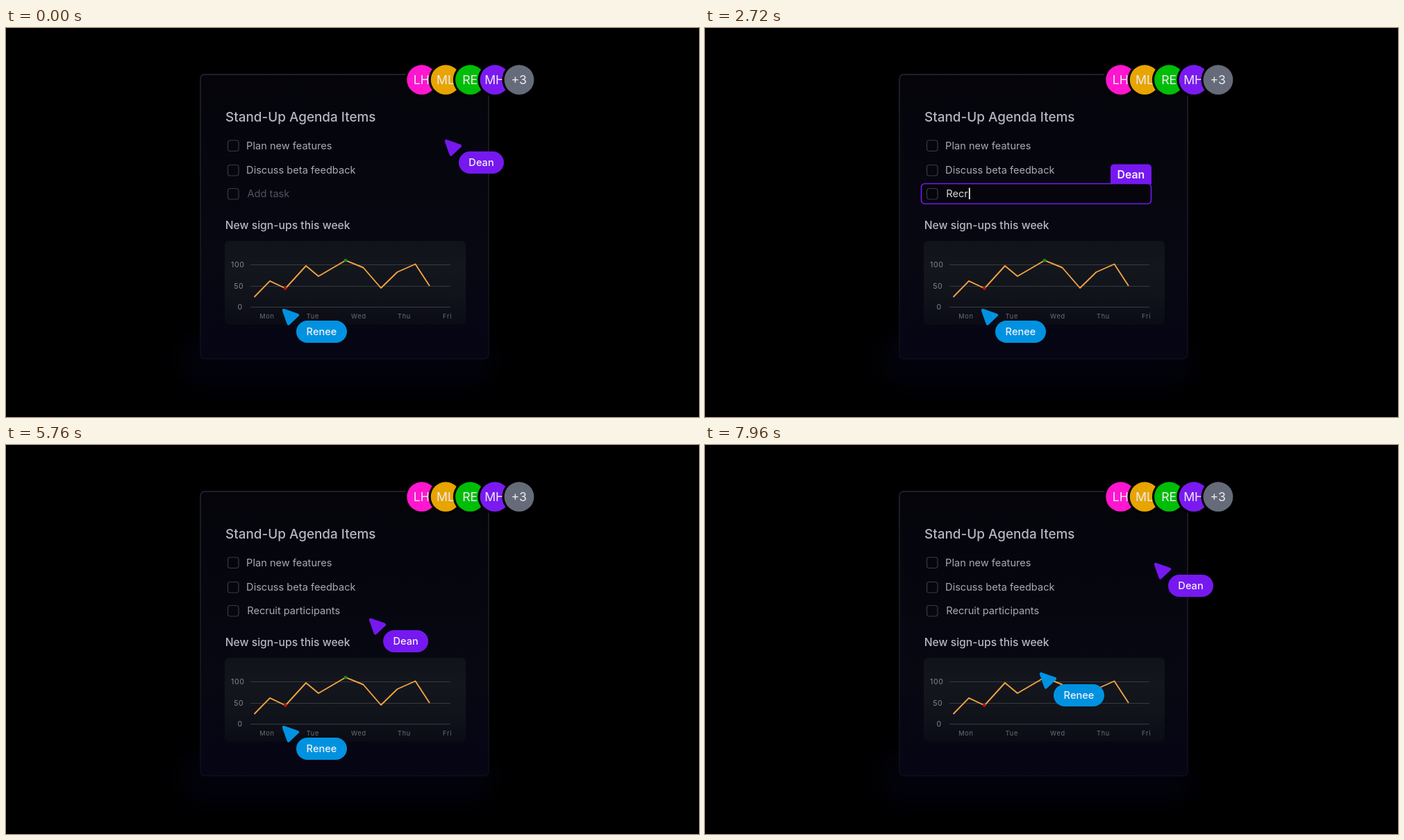
Recreate the animation shown at these times as an HTML page with a canvas. Size 998 by 561 pixels, loop 8 s.

```html
<!DOCTYPE html>
<html lang="en">
<head>
<meta charset="utf-8">
<title>Shared agenda</title>
<style>
  html, body { margin: 0; width: 100%; height: 100%; overflow: hidden; background: #000; }
  canvas { display: block; width: 998px; height: 561px; }
</style>
</head>
<body>
<canvas id="stage" width="998" height="561"></canvas>
<script>
const ctx = document.getElementById('stage').getContext('2d');
const LOOP = 8000;
const PURPLE = '#7618f0', BLUE = '#0092e0';
const TASK = 'Recruit participants';

// Times of the state changes, in ms
const HOVER_AT = 1240, FOCUS_AT = 1880, TYPE_AT = 2310, BLUR_AT = 4640;
const CHAR_MS = 100;

function text(str, x, y, size, color, { weight = 400, align = 'left', spacing = 0 } = {}) {
  ctx.font = `${weight} ${size}px Inter, sans-serif`;
  ctx.letterSpacing = spacing + 'px';
  ctx.textAlign = align;
  ctx.fillStyle = color;
  ctx.fillText(str, x, y);
  return ctx.measureText(str).width;
}

function box(x, y, w, h, r, fill, stroke, line = 1) {
  ctx.beginPath();
  ctx.roundRect(x, y, w, h, r);
  if (fill) { ctx.fillStyle = fill; ctx.fill(); }
  if (stroke) { ctx.strokeStyle = stroke; ctx.lineWidth = line; ctx.stroke(); }
}

function disc(x, y, r, color) {
  ctx.beginPath();
  ctx.arc(x, y, r, 0, Math.PI * 2);
  ctx.fillStyle = color;
  ctx.fill();
}

function vertical(y0, y1, ...colors) {
  const g = ctx.createLinearGradient(0, y0, 0, y1);
  colors.forEach((c, i) => g.addColorStop(i / (colors.length - 1), c));
  return g;
}

const clamp = v => Math.min(1, Math.max(0, v));
const ease = u => (1 - Math.cos(Math.PI * clamp(u))) / 2;
const mix = (a, b, u) => a + (b - a) * u;

// Smooth path through [time, x, y] keys, at rest at both ends
function follow(keys, t) {
  const last = keys.length - 1;
  if (t <= keys[0][0]) return keys[0].slice(1);
  if (t >= keys[last][0]) return keys[last].slice(1);
  const i = keys.findIndex(k => k[0] > t) - 1;
  const [a, b] = [keys[i], keys[i + 1]];
  const span = b[0] - a[0], u = (t - a[0]) / span;
  const slope = (n, d) => n === 0 || n === last ? 0
    : (keys[n + 1][d] - keys[n - 1][d]) / (keys[n + 1][0] - keys[n - 1][0]);
  return [1, 2].map(d =>
    mix(a[d], b[d], u * u * (3 - 2 * u)) +
    span * u * (1 - u) * (slope(i, d) * (1 - u) - slope(i + 1, d) * u));
}

const AWAY = [
  [4640, 480.5, 223.5], [5760, 523, 250], [6640, 687, 222],
  [6900, 696.5, 211], [7160, 692, 198], [7960, 647, 170]
];

function deanAt(t) {
  if (t >= BLUR_AT) return follow(AWAY, t);
  const u = ease((t - 80) / 1400);
  return [mix(632, 480.5, u), mix(161, 223.5, u)];
}

function reneeAt(t) {
  const s = ease((t - 6100) / 1300), q = 1 - s;
  const curve = (a, c, b) => q * q * a + 2 * s * q * c + s * s * b;
  return [curve(398, 427, 482), curve(405, 350, 328)];
}

function pointer([x, y], name, width, color) {
  ctx.save();
  ctx.translate(x, y);
  ctx.beginPath();
  ctx.moveTo(2, 2);
  ctx.lineTo(22, 9);
  ctx.lineTo(8.8, 21.3);
  ctx.closePath();
  ctx.fillStyle = ctx.strokeStyle = color;
  ctx.lineWidth = 4.4;
  ctx.lineJoin = 'round';
  ctx.fill();
  ctx.stroke();
  box(20, 17, width, 32, 16, color);
  text(name, 20 + width / 2, 38.2, 14.6, '#f2f0fa', { weight: 500, align: 'center' });
  ctx.restore();
}

function glow() {
  ctx.save();
  ctx.filter = 'blur(18px)';
  box(252, 440, 450, 76, 30, '#02020c');
  ctx.restore();
}

function card() {
  box(280, 67, 415, 410, 6, vertical(67, 477, '#04040a', '#06060f', '#080813', '#050514'),
    vertical(67, 477, '#272835', '#1f202d', '#1a1b28', '#0e0e1c'), 1.4);
  text('Stand-Up Agenda Items', 316, 135, 18.9, '#b6b7c2', { weight: 500 });
  text('New sign-ups this week', 315.7, 290, 15.7, '#b6b7c2', { weight: 500 });
}

function checkbox(y) {
  box(319.5, y - 7.5, 15.5, 15.5, 3.5, null, '#3a3b43', 1.2);
}

function tasks(t) {
  const focused = t >= FOCUS_AT && t < BLUR_AT;
  if (t >= HOVER_AT && t < FOCUS_AT) {
    box(311.5, 224.5, 331, 29, 5, '#1b1c25', '#343641', 1.2);
    box(319.5, 231.5, 15.5, 15.5, 3.5, '#07070d');
  }
  if (focused) {
    box(311.5, 224.5, 331, 29, 5, '#05050b', PURPLE, 1.6);
    box(584, 196.5, 59, 28.5, [5, 5, 0, 0], PURPLE);
    text('Dean', 613.3, 217, 15.8, '#f4f0ff', { weight: 600, align: 'center' });
  }
  [169.5, 205, 239].forEach(checkbox);
  text('Plan new features', 346.1, 174.7, 14.6, '#a9aab4');
  text('Discuss beta feedback', 346.1, 210, 14.6, '#a9aab4');

  const count = Math.max(0, Math.floor((t - TYPE_AT) / CHAR_MS));
  const typed = TASK.slice(0, count);
  if (!focused && !typed) {
    text('Add task', 347.5, 244, 14.6, '#4f5461');
    return;
  }
  const width = text(typed, 347.2, 244, 14.6, focused ? '#d5d6de' : '#a9aab4');
  if (focused) {
    ctx.fillStyle = '#f0f0f5';
    ctx.fillRect(347.2 + width + 1.2, 230.5, 1.8, 16.5);
  }
}

const SIGNUPS = [
  [357.5, 388], [380, 364.8], [402.5, 375.5], [432, 343], [450, 358], [489, 335.2],
  [514.5, 345.5], [540, 375], [563.5, 352], [589.5, 340.5], [610, 372]
];

function chart() {
  box(315, 307, 347, 121, 6, vertical(307, 428, '#11131a', '#14161d', '#11131b', '#0a0b15'));
  [['100', 333.8, 341], ['50', 335.3, 372], ['0', 337.2, 402]].forEach(([label, x, y]) => {
    ctx.fillStyle = '#373c3e';
    ctx.fillRect(352, y, 288, 1);
    text(label, x, y + 4, 10.6, '#858891', { align: 'center', spacing: 0.6 });
  });
  [['Mon', 376], ['Tue', 442], ['Wed', 508], ['Thu', 573.5], ['Fri', 635.7]].forEach(([day, x]) =>
    text(day, x, 418.8, 9.2, '#6c6f78', { align: 'center', spacing: 0.8 }));

  ctx.beginPath();
  SIGNUPS.forEach(([x, y]) => ctx.lineTo(x, y));
  ctx.strokeStyle = '#f2a340';
  ctx.lineWidth = 1.9;
  ctx.lineJoin = 'round';
  ctx.stroke();
  disc(402.3, 375.5, 2.4, '#b8120f');
  disc(489, 335.2, 2.4, '#178a24');
}

function avatars() {
  [
    ['LH', 598.7, '#ff16cf'], ['ML', 633.2, '#e8a400'], ['RE', 668.5, '#00be08'],
    ['MH', 704, '#7a1af0'], ['+3', 739, '#656b79']
  ].forEach(([label, x, color]) => {
    disc(x, 74.7, 24.6, '#000');
    disc(x, 74.7, 21.4, color);
    text(label, x - 0.3, 81.2, 17.7, '#ecebf0', { align: 'center' });
  });
}

function draw(t) {
  ctx.fillStyle = '#000';
  ctx.fillRect(0, 0, 998, 561);
  glow();
  card();
  chart();
  tasks(t);
  avatars();
  pointer(reneeAt(t), 'Renee', 73, BLUE);
  if (t < FOCUS_AT || t >= BLUR_AT) pointer(deanAt(t), 'Dean', 65, PURPLE);
}

const start = performance.now();
function tick() {
  draw((performance.now() - start) % LOOP);
  requestAnimationFrame(tick);
}
tick();
</script>
</body>
</html>
```
